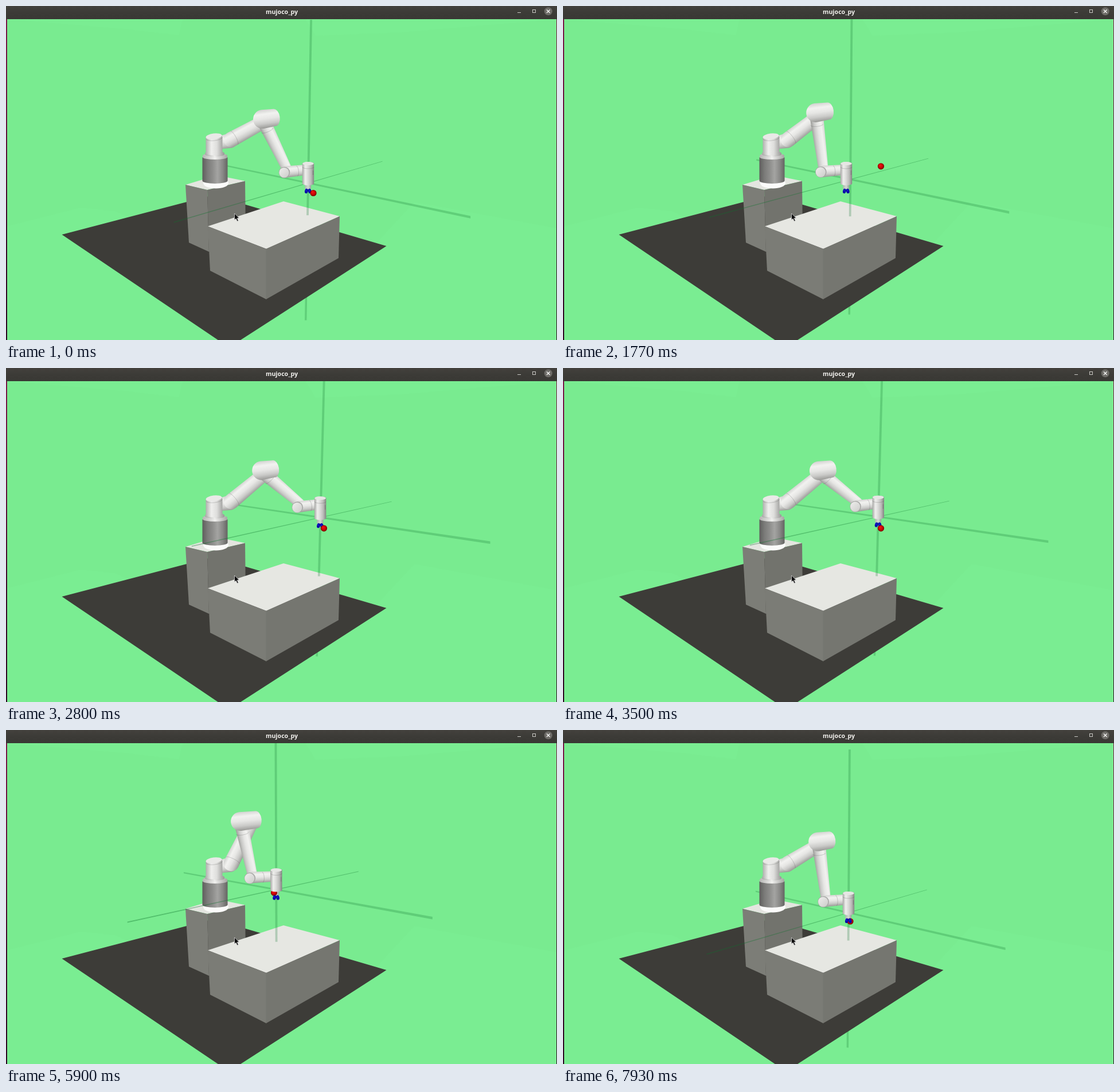
Recreate the animation shown at these times as an HTML page with a canvas. Size 961 by 583 pixels, loop 8 s.

```html
<!DOCTYPE html>
<html lang="en">
<head>
<meta charset="utf-8">
<title>mujoco_py</title>
<style>
html, body { margin: 0; width: 100%; height: 100%; overflow: hidden; background: #79eb90; }
canvas { display: block; }
</style>
</head>
<body>
<canvas id="stage" width="961" height="583"></canvas>
<script>
const ctx = document.getElementById('stage').getContext('2d');
const LOOP = 8000;
const HOME = { x: 494, y: 309 };
const SHOULDER = { x: 393, y: 233 };
const LAG = 60;

// The axes glide from one point to the goal, the arm trails behind; settle is the time constant
const EPISODES = [
  { at: 0, from: { x: 527, y: 309 }, goal: { x: 532.7, y: 303.8 }, settle: 220, ball: { x: 536, y: 326.5 }, front: true },
  { at: 1730, from: HOME, goal: { x: 550, y: 259.5 }, settle: 297, ball: { x: 554.5, y: 279.8 }, front: true },
  { at: 4230, from: HOME, goal: { x: 471.3, y: 278.5 }, settle: 60, ball: { x: 467.5, y: 284 }, front: false },
  { at: 6670, from: HOME, goal: { x: 498, y: 319 }, settle: 240, ball: { x: 501, y: 334 }, front: false }
];

function centreAt(ep, age) {
  const left = Math.exp(-Math.max(0, age) / ep.settle);
  const mix = k => ep.goal[k] + (ep.from[k] - ep.goal[k]) * left;
  return { x: mix('x'), y: mix('y') };
}

// Two-link reach; apparent lengths change with perspective
function armFor(tool) {
  const dx = tool.x - 527, dy = tool.y - 292;
  const wrist = { x: tool.x - 41.5 + 0.08 * dx, y: tool.y - 1.5 + 0.025 * dx };
  const upper = 65 - 0.24 * dy - 0.05 * dx;
  const fore = 100.4 + 0.18 * dy - 0.1 * dx;
  const wx = wrist.x - SHOULDER.x, wy = wrist.y - SHOULDER.y;
  const d = Math.hypot(wx, wy);
  const along = (upper * upper - fore * fore + d * d) / (2 * d);
  const out = Math.sqrt(Math.max(0, upper * upper - along * along));
  const elbow = {
    x: SHOULDER.x + (wx * along + wy * out) / d,
    y: SHOULDER.y + (wy * along - wx * out) / d
  };
  return { wrist, elbow };
}

function poly(fill, ...points) {
  ctx.beginPath();
  for (let i = 0; i < points.length; i += 2) ctx.lineTo(points[i], points[i + 1]);
  ctx.closePath();
  ctx.fillStyle = fill;
  ctx.fill();
}

function oval(x, y, rx, ry, fill, tilt = 0) {
  ctx.beginPath();
  ctx.ellipse(x, y, rx, ry, tilt, 0, Math.PI * 2);
  ctx.fillStyle = fill;
  ctx.fill();
}

function line(x0, y0, x1, y1, width, stroke) {
  ctx.beginPath();
  ctx.moveTo(x0, y0);
  ctx.lineTo(x1, y1);
  ctx.lineWidth = width;
  ctx.strokeStyle = stroke;
  ctx.stroke();
}

function rim(x, y, rx, ry, tilt, from, to) {
  ctx.beginPath();
  ctx.ellipse(x, y, rx, ry, tilt, from, to);
  ctx.lineWidth = 0.8;
  ctx.strokeStyle = 'rgba(90,90,88,.35)';
  ctx.stroke();
}

function ramp(x0, y0, x1, y1, ...colors) {
  const g = ctx.createLinearGradient(x0, y0, x1, y1);
  colors.forEach((c, i) => g.addColorStop(i / (colors.length - 1), c));
  return g;
}

const across = (x, r, ...colors) => ramp(x - r, 0, x + r, 0, ...colors);

// Tapered tube shaded across its width; cap flattens the far end
function tube(x0, y0, r0, x1, y1, r1, cap = 1) {
  const a = Math.atan2(y1 - y0, x1 - x0), q = Math.PI / 2;
  let nx = Math.sin(a), ny = -Math.cos(a);
  if (ny > 0) { nx = -nx; ny = -ny; }
  const mx = (x0 + x1) / 2, my = (y0 + y1) / 2, r = Math.max(r0, r1);
  ctx.beginPath();
  ctx.arc(x0, y0, r0, a + q, a + 3 * q);
  ctx.ellipse(x1, y1, r1 * cap, r1, a, -q, q);
  ctx.closePath();
  ctx.fillStyle = ramp(mx + nx * r, my + ny * r, mx - nx * r, my - ny * r,
    '#d2d2d0', '#f2f2f0', '#e6e6e4', '#cacac8', '#999996');
  ctx.fill();
}

// Upright cylinder with curved ends
function drum(x, top, bottom, r, ry, fill) {
  ctx.beginPath();
  ctx.ellipse(x, top, r, ry, 0, Math.PI, 0);
  ctx.ellipse(x, bottom, r, ry, 0, 0, Math.PI);
  ctx.closePath();
  ctx.fillStyle = fill;
  ctx.fill();
}

// Seam across a tube at distance d from its first end
function seam(x0, y0, x1, y1, d, r) {
  const a = Math.atan2(y1 - y0, x1 - x0);
  rim(x0 + Math.cos(a) * d, y0 + Math.sin(a) * d, 3, r, a, -Math.PI / 2, Math.PI / 2);
}

function drawBackdrop() {
  poly('#79eb90', 0, 0, 961, 0, 961, 583, 0, 583);
  const soft = '#7aed92';
  poly(soft, 0, 23, 308, 23, 302, 51, 205, 40);
  poly(soft, 522, 23, 961, 23, 690, 46, 540, 52);
  poly(soft, 0, 385, 130, 352, 190, 358, 320, 420, 640, 420, 712, 342, 961, 388, 961, 583, 0, 583);
}

function drawFloor() {
  poly('#3d3c38', 97.5, 399, 361, 330, 663.5, 419, 389, 596);
}

function drawPedestal() {
  poly('#e4e5e0', 313, 312, 368, 295.5, 417, 305.5, 351, 321);
  poly('#7c7d77', 313, 312, 351, 321, 354, 429, 319, 413);
  poly('#72736d', 351, 321, 417, 305.5, 418, 400, 354, 429);
}

function drawTable() {
  poly('#e6e7e2', 352, 384.5, 484, 341, 582, 367, 454, 424);
  poly('#7b7c76', 352, 384.5, 454, 424, 454, 512, 356, 462);
  poly('#757670', 453.5, 424, 582, 367, 580, 440, 453.5, 512);
}

function drawBase() {
  oval(366, 309, 22, 9.5, '#fbfbfa');
  drum(364.5, 265, 305, 22, 5,
    across(364.5, 22, '#5e5e5c', '#7b7b79', '#8d8d8b', '#a4a4a2', '#8a8a88', '#646462'));
  drum(364.5, 261, 264, 21.5, 4, across(364.5, 21.5, '#b5b5b3', '#f0f0ee', '#a5a5a3'));
  drum(364, 257, 259, 17, 4, across(364, 17, '#a9a9a7', '#ececea', '#989896'));
}

function drawShoulder() {
  tube(370, 239, 11, 391, 235, 13);
  drum(363, 229, 256, 14.5, 5, across(363, 14.5, '#b0b0ae', '#efefed', '#dededc', '#a6a6a4'));
  oval(362.5, 227.5, 14, 5, '#e9e9e7', -0.12);
  rim(363, 231, 14, 4, -0.1, 0, Math.PI);
}

function drawArm({ x: ex, y: ey }, { x: wx, y: wy }) {
  const fx = ex + 15 + (448 - ex) * 0.18, fy = ey - 2.5;
  tube(SHOULDER.x, SHOULDER.y, 13.5, fx, fy, 11.5);
  seam(SHOULDER.x, SHOULDER.y, fx, fy, 6, 13);
  tube(ex + 1, ey + 2, 12, wx + 4, wy - 7, 8.5);
  seam(ex, ey, wx, wy, 21, 11);
  tube(ex, ey, 16.5, fx + 6, fy - 0.5, 15, 0.6);
}

function drawWrist({ x: wx, y: wy }, { x: tx, y: ty }) {
  tube(wx + 3, wy - 1, 10, tx - 4, ty - 6, 9);
  seam(wx, wy, tx, ty - 6, 22, 9);
  oval(wx, wy, 9.8, 9.8, '#a8a8a6');
  oval(wx - 0.5, wy + 0.3, 8.6, 8.8, ramp(wx - 9, wy - 9, wx + 9, wy + 9, '#efefed', '#cbcbc9'));
}

function drawTool({ x, y }) {
  drum(x, y - 17, y + 18, 10.2, 3, across(x, 10, '#a9a9a7', '#efefed', '#d9d9d7', '#bcbcba', '#868684'));
  oval(x, y - 17, 9.8, 3, '#e6e6e4');
  rim(x, y - 11, 10, 3, 0, 0, Math.PI);
  line(x + 8.5, y - 5, x + 8.5, y + 3, 1.2, 'rgba(110,110,108,.6)');
}

function drawFingers({ x, y }) {
  for (const side of [-1, 1]) {
    const fx = x - 0.2 + side * 2.9;
    oval(fx, y + 31, 2.8, 4.2, '#0808a6', -side * 0.25);
    oval(fx - 0.4, y + 30, 1.2, 2, '#1414d0');
  }
}

function drawBall({ x, y }) {
  const g = ctx.createRadialGradient(x - 1.5, y - 2, 0.5, x, y, 5.6);
  g.addColorStop(0, '#f01414');
  g.addColorStop(0.55, '#d00404');
  g.addColorStop(1, '#780000');
  oval(x, y, 5.6, 5.6, g);
}

function drawWindow() {
  poly(ramp(0, 0, 0, 23, '#43413d', '#3c3b37', '#393834'), 0, 0, 961, 0, 961, 23, 0, 23);
  ctx.fillStyle = ramp(0, 23, 0, 583, '#7b1b4a', '#64163f', '#3b0d2b', '#2d0a24');
  ctx.fillRect(0, 23, 2, 560);
  ctx.fillRect(960, 23, 1, 560);
  ctx.font = 'bold 10.6px "Open Sans", "Noto Sans", sans-serif';
  ctx.textAlign = 'center';
  ctx.fillStyle = '#f2f1ee';
  ctx.fillText('mujoco_py', 481, 13.5);
  line(892, 11.5, 898, 11.5, 1, '#c9c8c4');
  ctx.strokeRect(918.5, 6.5, 5, 5);
  oval(945.8, 9.2, 7, 7, '#6e6c68');
  for (const s of [-1, 1]) line(945.8 - 2.8, 9.2 - 2.8 * s, 945.8 + 2.8, 9.2 + 2.8 * s, 1.4, '#f4f4f2');
}

function drawCursor() {
  ctx.save();
  ctx.translate(398.5, 362);
  poly('#0c0c0c', 0, 0, 0, 11.5, 2.6, 9.2, 4.8, 13.8, 6.8, 12.8, 4.7, 8.4, 8, 8);
  ctx.lineWidth = 0.8;
  ctx.strokeStyle = '#d8d8d8';
  ctx.stroke();
  ctx.restore();
}

// Screen shape of the three axes around their centre
function axesAt({ x, y }) {
  const dx = x - 527, dy = y - 309;
  const lean = (480 - x) * 0.00038;
  const atY = v => x + (v - y) * lean;
  const shade = 'rgba(20,120,50,.26)';
  const upright = (from, to, width) => line(atY(from), from, atY(to), to, width, shade);
  return {
    below: () => upright(400, y + 235 + (x - 495) * 0.14, 3.4),
    above: () => upright(y - 285, 367 - (x - 505) * 0.08, 3.8),
    thick() {
      const rx = 283 + 0.27 * dx - 0.15 * dy, ry = 59.7 + 0.328 * dy;
      const lx = x - rx * 0.592, ly = y - ry * 0.592;
      poly(shade, lx, ly - 1.2, x + rx, y + ry - 2.2, x + rx, y + ry + 2.2, lx, ly + 1.2);
    },
    thin() {
      const rx = 129.5 - 0.25 * dx, ry = -37.9 - 0.21 * dy;
      const lx = x - rx * 1.81, ly = y - ry * 1.81;
      poly('rgba(15,115,45,.36)', x + rx, y + ry - 0.4, x + rx, y + ry + 0.4, lx, ly + 0.9, lx, ly - 0.9);
    }
  };
}

function draw(t) {
  const ep = EPISODES.filter(e => e.at <= t).pop();
  const age = t - ep.at;
  const axes = axesAt(centreAt(ep, age));
  const trail = centreAt(ep, age - LAG);
  const tool = { x: trail.x, y: trail.y - 17 };
  const { wrist, elbow } = armFor(tool);

  drawBackdrop();
  axes.below();
  drawFloor();
  drawPedestal();
  axes.thick();
  drawTable();
  drawBase();
  axes.thin();
  axes.above();

  drawShoulder();
  drawArm(elbow, wrist);
  drawWrist(wrist, tool);
  drum(tool.x - 0.3, tool.y + 20, tool.y + 26, 5.5, 2, across(tool.x, 6, '#a9b5ab', '#d3dad3', '#8d9a90'));
  if (!ep.front) drawBall(ep.ball);
  drawTool(tool);
  drawFingers(tool);
  if (ep.front) drawBall(ep.ball);

  drawWindow();
  drawCursor();
}

const began = performance.now();
function tick() {
  draw((performance.now() - began) % LOOP);
  requestAnimationFrame(tick);
}
tick();
</script>
</body>
</html>
```
